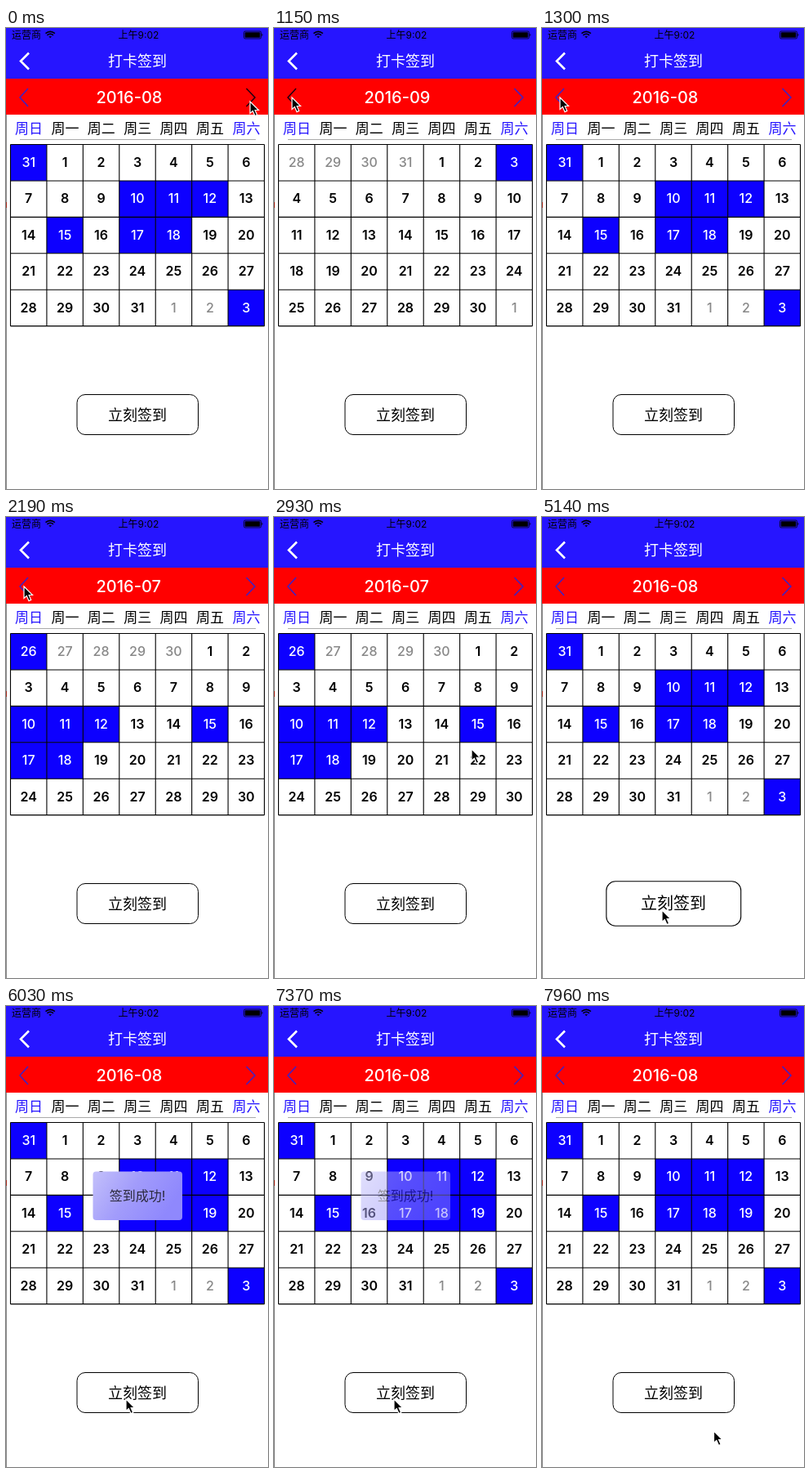
An HTML page that plays this animation: 321x564 px, repeating every 8 s.

```html
<!DOCTYPE html>
<html lang="zh">
<head>
<meta charset="utf-8">
<title>打卡签到</title>
<style>
html, body { margin: 0; width: 100%; height: 100%; overflow: hidden; background: #fff; }
svg { display: block; width: 100%; height: 100%; }
text { font-family: Inter, "Noto Sans CJK SC", "Noto Sans CJK", sans-serif; }
.mid { text-anchor: middle; }
.line { fill: none; stroke: #000; }
</style>
</head>
<body>
<svg viewBox="0 0 321 564">
  <defs>
    <linearGradient id="haze" x2="1" y2=".35">
      <stop offset="0" stop-color="#c3c0fa"/>
      <stop offset=".5" stop-color="#a29cfb"/>
      <stop offset="1" stop-color="#8f88fd"/>
    </linearGradient>
  </defs>
  <rect width="321" height="564" fill="#fff"/>
  <rect width="321" height="62" fill="#2615ff"/>
  <rect y="62" width="321" height="44" fill="#f00"/>
  <path d="M.5 106V564" stroke="#888"/>
  <path d="M.5 213v7" stroke="#a32a1c"/>

  <text x="7" y="12.5" font-size="12">运营商</text>
  <g class="line" stroke-width="1.6">
    <path d="M48.5 6.6q5.7-4.6 11.4 0M50.4 8.8q3.8-3 7.6 0"/>
    <path d="M52.3 10.2h3.8l-1.9 2z" fill="#000" stroke="none"/>
  </g>
  <text class="mid" x="162.500" y="12.500" font-size="12">上午9:02</text>
  <rect class="line" x="291.500" y="4" width="21" height="9" rx="1.500" stroke-width=".8"/>
  <rect x="292.700" y="5.200" width="18.600" height="6.600" rx=".6"/>
  <path d="M313.500 6.800q2 1.700 0 3.400z"/>

  <path d="M28 30.500 18 40.500l10 10" fill="none" stroke="#fff" stroke-width="2.600"/>
  <text class="mid" x="161" y="46.500" font-size="18" font-weight="500" fill="#fff">打卡签到</text>
  <path id="prev" d="M27 74 17 85l10 11" fill="none" stroke-width="1.500"/>
  <path id="next" d="M294.500 74l10.500 11-10.500 11" fill="none" stroke-width="1.500"/>
  <text id="month" x="110.500" y="92" font-size="20" font-weight="500" fill="#fff"></text>

  <g id="week"></g>
  <path d="M17 136.500H306" stroke="#aaa"/>
  <g id="cells"></g>
  <path id="grid" class="line" stroke-width="1.100"/>

  <g id="button">
    <rect class="line" x="87" y="448.500" width="148.500" height="49" rx="10"/>
    <text class="mid" x="161" y="479.500" font-size="18">立刻签到</text>
  </g>
  <g id="toast">
    <rect x="106.500" y="202.500" width="109.500" height="59.500" rx="4" fill="url(#haze)"/>
    <text class="mid" x="161" y="238" font-size="16" fill="#2c2a3c">签到成功!</text>
  </g>
  <path id="cursor" d="M0 0V14.500L3.300 11.500 6 17.600 8.700 16.400 6.100 10.500H10.500Z" stroke="#fff" stroke-width="1.200"/>
</svg>
<script>
const LOOP = 8000, SIZE = 44.43, LEFT = 5.5, TOP = 142.5, BLUE = '#0d00ff';
const $ = id => document.getElementById(id);

function add(parent, tag, attrs, text = '') {
  const el = document.createElementNS('http://www.w3.org/2000/svg', tag);
  for (const k in attrs) el.setAttribute(k, attrs[k]);
  el.textContent = text;
  return parent.appendChild(el);
}

// lead: days shown from the month before, last: its final date
const months = {
  '2016-07': { lead: 5, last: 30, days: 31, marks: [0, 14, 15, 16, 19, 21, 22] },
  '2016-08': { lead: 1, last: 31, days: 31, marks: [0, 10, 11, 12, 15, 17, 18, 34] },
  '2016-09': { lead: 4, last: 31, days: 30, marks: [6] }
};

[...'日一二三四五六'].forEach((d, i) => add($('week'), 'text', {
  class: 'mid', x: 28 + i * 44.4, y: 128.5, 'font-size': 17, 'font-weight': 350,
  fill: i % 6 ? '#000' : '#2615ff'
}, '周' + d));

const cells = Array.from({ length: 35 }, (_, i) => {
  const x = LEFT + i % 7 * SIZE, y = TOP + Math.floor(i / 7) * SIZE;
  return {
    box: add($('cells'), 'rect', { x, y, width: SIZE, height: SIZE }),
    num: add($('cells'), 'text', { class: 'mid', x: x + SIZE / 2, y: y + 27.5, 'font-size': 16 })
  };
});

let lines = '';
for (let i = 0; i < 8; i++) lines += `M${LEFT + i * SIZE} ${TOP}v${5 * SIZE}`;
for (let i = 0; i < 6; i++) lines += `M${LEFT} ${TOP + i * SIZE}h${7 * SIZE}`;
$('grid').setAttribute('d', lines);

let shown = '';
function showMonth(name, signed) {
  if (shown === name + signed) return;
  shown = name + signed;
  $('month').textContent = name;
  const { lead, last, days, marks } = months[name];
  cells.forEach(({ box, num }, i) => {
    const day = i - lead + 1;
    const inside = day > 0 && day <= days;
    const marked = marks.includes(i) || (signed && i === 19);
    box.setAttribute('fill', marked ? BLUE : '#fff');
    num.textContent = inside ? day : day > 0 ? day - days : last + day;
    num.setAttribute('fill', marked ? '#fff' : inside ? '#000' : '#888');
    num.setAttribute('font-weight', inside && !marked ? 600 : 500);
  });
}

// stepped pointer moves along quadratic curves
const moves = [
  { at: 560, step: 147.5, n: 5, from: [299, 90], via: [160, 110], to: [22, 85] },
  { at: 2340, step: 146.6, n: 7, from: [22, 85], via: [150, 690], to: [301, 95] },
  { at: 3670, step: 145, n: 5, from: [301, 95], via: [250, 300], to: [147, 481] },
  { at: 7960, step: 150, n: 1, from: [147, 481], via: [180, 500], to: [210.5, 520] }
];

function pointer(t) {
  const m = moves.filter(m => t >= m.at).pop();
  if (!m) return moves[0].from;
  const k = Math.min(1, (Math.floor((t - m.at) / m.step) + 1) / m.n);
  const u = k * k * (3 - 2 * k), v = 1 - u;
  return m.from.map((a, i) => v * v * a + 2 * u * v * m.via[i] + u * u * m.to[i]);
}

function draw(t) {
  const within = (a, b) => t >= a && t < b;
  const name = within(130, 1300) ? '2016-09' : within(2190, 3520) ? '2016-07' : '2016-08';
  showMonth(name, t >= 5880);

  const tint = down => down ? '#200010' : '#3a22c8';
  $('prev').setAttribute('stroke', tint(within(1150, 1300)));
  $('next').setAttribute('stroke', tint(within(0, 130) || within(3370, 3520)));

  const zoom = within(5140, 5290) ? 1.11 : 1;
  $('button').setAttribute('transform', `translate(161 473) scale(${zoom}) translate(-161 -473)`);
  $('toast').setAttribute('opacity', within(6030, 7370) ? 1 : within(5880, 7520) ? 0.5 : 0);
  $('cursor').setAttribute('transform', `translate(${pointer(t)})`);
}

function tick() {
  draw(performance.now() % LOOP);
  requestAnimationFrame(tick);
}
tick();
</script>
</body>
</html>
```
